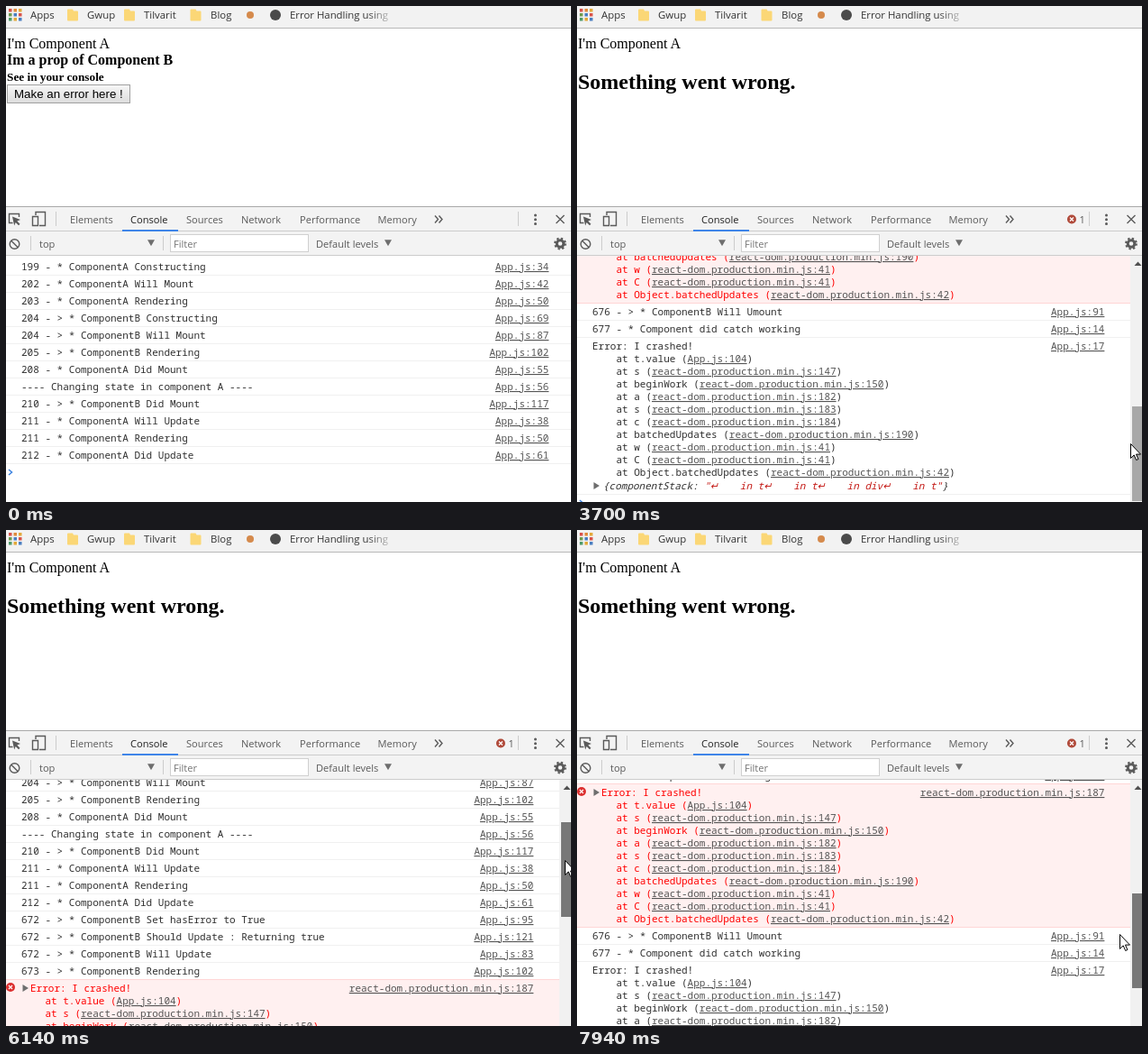
An HTML page for the animation above (8 s loop, 627x550 px).

```html
<!DOCTYPE html>
<html lang="en">
<head>
<meta charset="utf-8">
<title>Error boundary demo</title>
<style>
  html, body { margin: 0; width: 100%; height: 100%; overflow: hidden; background: #fff; }
  svg { display: block; }
  text { white-space: pre; }
  .ui { font: 11.1px "Open Sans", sans-serif; fill: #5a5a5a; }
  .marks { font: 11.4px "Open Sans", sans-serif; fill: #333; }
  .page { font: 16px "Liberation Serif", serif; fill: #000; }
  .page .b { font-weight: bold; }
  .btn { font: 13.33px "Liberation Sans", sans-serif; }
  .log { font: 11px "Noto Sans Mono", monospace; fill: #303030; }
  .link { fill: #545454; text-decoration: underline; }
  .loc { text-anchor: end; }
  .err { fill: #f00; }
  .obj { font-style: italic; }
  .str { fill: #c41a16; }
  .line { stroke: #ccc; }
  .icon { fill: none; stroke: #5a5a5a; stroke-width: 1.4; }
  .after { display: none; }
  .crashed .after { display: inline; }
  .crashed .before { display: none; }
  .crashed .loc { transform: translateX(-17px); }
</style>
</head>
<body>
<svg id="stage" width="627" height="550" viewBox="0 0 627 550">
  <defs>
    <linearGradient id="face" x2="0" y2="1">
      <stop offset="0" stop-color="#f6f6f6"/><stop offset="1" stop-color="#dddddd"/>
    </linearGradient>
    <linearGradient id="lit" x2="0" y2="1">
      <stop offset="0" stop-color="#fafafa"/><stop offset="1" stop-color="#e4e4e4"/>
    </linearGradient>
    <linearGradient id="down" x2="0" y2="1">
      <stop offset="0" stop-color="#d8d8d8"/><stop offset="1" stop-color="#eeeeee"/>
    </linearGradient>
    <linearGradient id="fade">
      <stop offset="0" stop-color="#f2f2f2" stop-opacity="0"/><stop offset="1" stop-color="#f2f2f2" stop-opacity=".75"/>
    </linearGradient>
    <path id="folder" d="M1 0h5l1 2h4q1 0 1 1v9q0 1-1 1H1q-1 0-1-1V1q0-1 1-1z" fill="#fbd776"/>
    <path id="tri" d="M-4-3.5h8L0 3.5z" fill="#6e6e6e"/>
    <g id="cross">
      <circle r="5"/>
      <path d="M-2-2 2 2M2-2-2 2" stroke="#fff" stroke-width="1.3"/>
    </g>
  </defs>
  <rect width="627" height="550" fill="#fff"/>

  <g class="marks">
    <rect width="627" height="24" fill="#f2f2f2"/>
    <path d="M0 24.5h627" stroke="#b9b9b9"/>
    <g id="apps"></g>
    <text x="27" y="14">Apps</text>
    <use href="#folder" x="68" y="3.5"/><text x="90" y="14">Gwup</text>
    <use href="#folder" x="131" y="3.5"/><text x="153" y="14">Tilvarit</text>
    <use href="#folder" x="204.500" y="3.5"/><text x="227" y="14">Blog</text>
    <circle cx="271" cy="10" r="4" fill="#d58a4c"/>
    <circle cx="299" cy="10" r="6" fill="#4a4a4a"/>
    <text x="315" y="14">Error Handling using</text>
    <rect x="400" y="2" width="26" height="20" fill="url(#fade)"/>
  </g>

  <g class="page">
    <text x="1" y="47">I'm Component A</text>
    <g class="before">
      <text class="b" x="1" y="65">Im a prop of Component B</text>
      <text class="b" x="1" y="83" font-size="13.28">See in your console</text>
      <rect id="button" x="1.5" y="87.500" width="136" height="20" fill="url(#face)" stroke="#a0a0a0"/>
      <text class="btn" x="9" y="102">Make an error here !</text>
    </g>
    <text class="after b" x="1" y="92" font-size="24">Something went wrong.</text>
  </g>

  <g class="ui">
    <rect y="222" width="627" height="55" fill="#f3f3f3"/>
    <path d="M0 222.500h627" stroke="#a9a9a9"/>
    <path class="line" d="M0 249.500h627M0 276.500h627M55.500 228v16M568.500 228v16M27.500 255v16M174.500 255v16"/>
    <path class="icon" d="M14.500 234v-3.500h-11v10h4"/>
    <path d="M7 233.500l9 3.500-3.700 1.500 3.200 3.300-1.500 1.500-3.300-3.300-1.500 3.500z" fill="#5a5a5a"/>
    <path class="icon" d="M33 232v-3.500h10.500v15H37M29.500 233.500h6v10h-6z"/>
    <text x="71" y="241">Elements</text>
    <text x="138" y="241" fill="#222">Console</text>
    <text x="200" y="241">Sources</text>
    <text x="261" y="241">Network</text>
    <text x="326" y="241">Performance</text>
    <text x="412.500" y="241">Memory</text>
    <rect x="129" y="248" width="62" height="2" fill="#3f85e8"/>
    <path class="icon" d="M476 232.500l3.500 4-3.500 4M480.500 232.500l3.500 4-3.500 4"/>
    <g class="after">
      <use href="#cross" x="549" y="236.500" fill="#b04a3a"/>
      <text x="557.500" y="241">1</text>
    </g>
    <g fill="#5a5a5a">
      <circle cx="587.500" cy="232" r="1.500"/><circle cx="587.500" cy="236.800" r="1.500"/><circle cx="587.500" cy="241.500" r="1.500"/>
    </g>
    <path class="icon" d="M610.500 232l9 9M619.500 232l-9 9"/>

    <g class="icon" stroke-width="1.800"><circle cx="9.500" cy="264" r="5.300"/><path d="M5.800 260.300l7.400 7.400"/></g>
    <text x="37" y="268">top</text>
    <use href="#tri" x="161" y="262.800"/>
    <rect x="182.500" y="253.500" width="153" height="19" fill="#fff" stroke="#d0d0d0"/>
    <text x="186" y="268" fill="#757575">Filter</text>
    <text x="344" y="268">Default levels</text>
    <use href="#tri" x="424" y="262.800"/>
    <g fill="none" stroke="#5a5a5a">
      <circle cx="615" cy="263.500" r="3.800" stroke-width="3"/>
      <circle cx="615" cy="263.500" r="5.900" stroke-width="2" stroke-dasharray="2.320 2.320"/>
    </g>
  </g>

  <svg y="277" width="627" height="273">
    <g id="log" class="log"></g>
    <g class="after">
      <rect x="614" width="17" height="273" fill="#f1f1f1"/>
      <path d="M618.500 11l4-4.500 4 4.500z" fill="#505050"/>
      <rect id="thumb" x="616" width="13" height="105"/>
    </g>
  </svg>

  <path id="cursor" d="M.5.5v16l3.700-3.600 2.500 5.600 2.200-1-2.400-5.400h5z" fill="#fff" stroke="#000"/>
</svg>

<script>
const $ = id => document.getElementById(id);
const ROW = 19, LINE = 14, CHAR = 6.6;

$("apps").innerHTML = ["#d9534a", "#e08a3c", "#e3a93a", "#6f9a4e", "#4a7fc1", "#d9534a", "#4f9a6a", "#e3a93a", "#4a7fc1"]
  .map((c, i) => `<rect x="${3 + i % 3 * 5.5}" y="${3 + (i / 3 | 0) * 5}" width="3.5" height="3.5" fill="${c}"/>`).join("");

// Console: every y is the middle of a text line, counted from the first row.
const A = "* ComponentA ", B = "> * ComponentB ", DOM = "react-dom.production.min.js:";
const early = [
  ["199 - " + A + "Constructing", 34], ["202 - " + A + "Will Mount", 42], ["203 - " + A + "Rendering", 50],
  ["204 - " + B + "Constructing", 69], ["204 - " + B + "Will Mount", 87], ["205 - " + B + "Rendering", 102],
  ["208 - " + A + "Did Mount", 55], ["---- Changing state in component A ----", 56],
  ["210 - " + B + "Did Mount", 117], ["211 - " + A + "Will Update", 38],
  ["211 - " + A + "Rendering", 50], ["212 - " + A + "Did Update", 61]
];
const update = [
  ["672 - " + B + "Set hasError to True", 95], ["672 - " + B + "Should Update : Returning true", 121],
  ["672 - " + B + "Will Update", 83], ["673 - " + B + "Rendering", 102]
];
const caught = [["676 - " + B + "Will Umount", 91], ["677 - * Component did catch working", 14]];
const stack = [
  ["t.value", "App.js:104"], ["s", DOM + 147], ["beginWork", DOM + 150], ["a", DOM + 182], ["s", DOM + 183],
  ["c", DOM + 184], ["batchedUpdates", DOM + 190], ["w", DOM + 41], ["C", DOM + 41], ["Object.batchedUpdates", DOM + 42]
];

const esc = s => s.replace(/>/g, "&gt;");
const text = (x, y, s, cls = "") => `<text x="${x}" y="${y + 4}" class="${cls}">${s}</text>`;
const loc = (y, s) => text(602.4, y, s, "link loc");
const rule = (y, c = "#f0f0f0") => `<rect y="${y}" width="627" height="1" fill="${c}"/>`;
const arrow = y => `<path d="M18.500 ${y - 4}v8l6.500-4z" fill="#6e6e6e"/>`;
const prompt = y => `<path d="M3 ${y - 3}l3.500 3-3.500 3" fill="none" stroke="#3b82e0" stroke-width="1.500"/>`;

const rows = (list, y) => list.map(([s, n], i) => {
  const c = y + i * ROW;
  return text(17, c, esc(s)) + loc(c, "App.js:" + n) + rule(c + 9);
}).join("");

const trace = (y, cls) => stack.map(([fn, at], i) =>
  text(17, y + (i + 1) * LINE, `    at ${fn} (<tspan class="link">${at}</tspan>)`, cls)).join("");

function thrown(y) {
  const h = stack.length * LINE + ROW;
  return `<rect y="${y - 10}" width="627" height="${h}" fill="#fff0f0"/>` +
    rule(y - 10, "#ffd6d6") + rule(y + h - 10, "#ffd6d6") +
    `<use href="#cross" x="5" y="${y - 1}" fill="#dc2f2f"/>` + arrow(y) +
    text(27, y, "Error: I crashed!", "err") + loc(y, DOM + 187) + trace(y, "err");
}

function componentStack(y) {
  let col = 0;
  const put = (s, cls = "") => {
    const out = `<tspan x="${29 + col * CHAR}" class="${cls}">${s}</tspan>`;
    col += s.length;
    return out;
  };
  let out = put("{componentStack: ") + put('"', "str");
  for (const tag of ["t", "t", "div", "t"]) out += put("↵", "str") + put("    in " + tag, "str");
  out += put('"', "str") + put("}");
  return arrow(y) + text(29, y, out, "obj");
}

$("log").innerHTML = rows(early, 0) + `<g class="before">${prompt(228)}</g>` +
  `<g class="after">${rows(update, 228)}${thrown(304)}${rows(caught, 463)}` +
  text(17, 501, "Error: I crashed!") + loc(501, "App.js:17") + trace(501) +
  componentStack(656) + rule(665) + prompt(675) + "</g>";

// The screen refreshes only in these bursts: [first, last, refreshes].
const bursts = [
  [650, 1050, 6], [1350, 1350, 1], [1590, 2070, 7], [2230, 2360, 3], [2840, 3630, 11], [3700, 3930, 4],
  [4090, 4880, 11], [5120, 5900, 11], [5980, 6750, 11], [6840, 7620, 11], [7690, 7940, 4]
];
// [time, x, y]
const approach = [
  [570, 640, 222], [650, 616, 217], [1050, 286, 112], [1350, 269, 113], [1590, 269, 114],
  [2070, 97, 97], [2760, 97, 97], [3630, 614, 484]
];
// [time, x, scroll, grip below the top of the thumb]
const drag = [
  [3630, 614, 413, 41], [3700, 614, 413, 41], [4010, 616, 413, 42], [4200, 618, 370, 42], [4700, 623, 55, 42],
  [4880, 624, 0, 42], [5120, 625, 0, 42], [5666, 625, 30, 42], [6596, 615, 140, 42], [7308, 607, 247, 43], [7940, 602, 302, 45]
];

const smooth = k => k * k * (3 - 2 * k);

function hold(t) {
  const b = bursts.filter(b => b[0] <= t).pop();
  if (!b) return 0;
  const [from, to, n] = b, step = (to - from) / (n - 1) || 1;
  return from + step * Math.min(n - 1, Math.floor((t - from) / step + 0.25));
}

function sample(keys, t, ease = k => k) {
  const i = keys.findIndex(k => k[0] > t);
  if (i === 0) return keys[0].slice(1);
  if (i < 0) return keys[keys.length - 1].slice(1);
  const a = keys[i - 1], b = keys[i], k = ease((t - a[0]) / (b[0] - a[0]));
  return a.slice(1).map((v, j) => v + (b[j + 1] - v) * k);
}

function render(time) {
  const t = hold(time), crashed = t >= 2290;
  const [dx, offset, grip] = sample(drag, t);
  const scroll = crashed ? Math.round(offset) : 0;
  const top = Math.round(16 + scroll * 0.3655);
  const [x, y] = t < 3630 ? sample(approach, t, smooth) : [dx, 277 + top + grip];
  const over = t >= 650 && x < 138 && y < 108;

  $("stage").classList.toggle("crashed", crashed);
  $("button").setAttribute("fill", `url(#${t >= 2230 ? "down" : over ? "lit" : "face"})`);
  $("button").setAttribute("stroke", over ? "#888" : "#a0a0a0");
  $("log").setAttribute("transform", `translate(0 ${12 - scroll})`);
  $("thumb").setAttribute("y", top);
  $("thumb").setAttribute("fill", t < 3625 ? "#c1c1c1" : t < 3900 ? "#a8a8a8" : "#787878");
  $("cursor").setAttribute("transform", `translate(${Math.round(x)} ${Math.round(y)})`);
  $("cursor").setAttribute("visibility", t < 650 ? "hidden" : "visible");
}

const start = performance.now();
function tick() {
  render((performance.now() - start) % 8000);
  requestAnimationFrame(tick);
}
tick();
</script>
</body>
</html>
```
